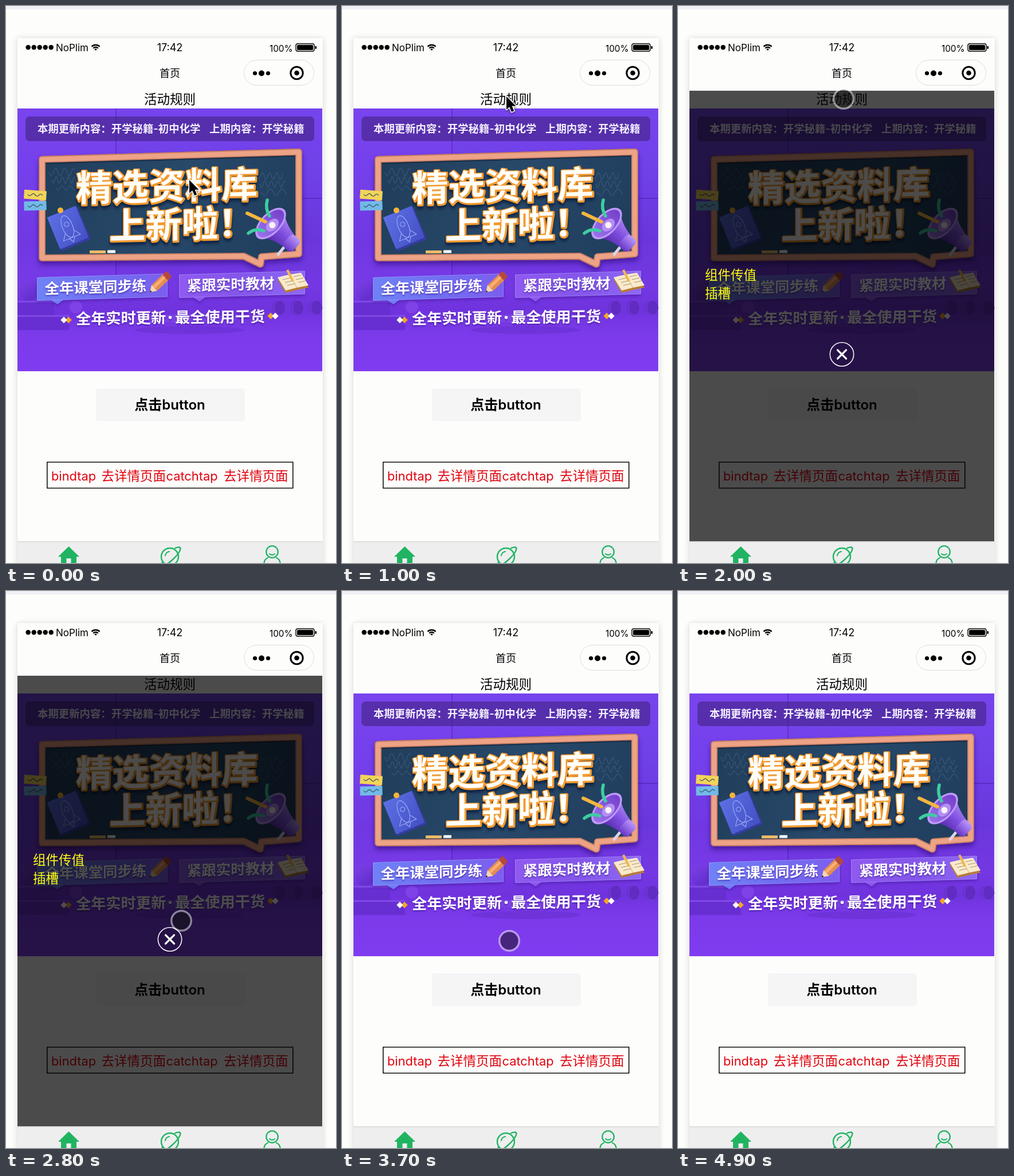
An HTML page with a canvas for the animation above (5000 ms loop, 576 px wide and 973 px high).

```html
<!DOCTYPE html>
<html lang="zh-CN">
<head>
<meta charset="utf-8">
<title>首页</title>
<style>
html, body { margin: 0; width: 100%; height: 100%; overflow: hidden; background: #fdfdfb; }
canvas { display: block; width: 576px; height: 973px; }
</style>
</head>
<body>
<canvas id="stage" width="576" height="973"></canvas>
<script>
const W = 576, H = 973, LOOP = 5000, STEP = 100;
const LEFT = 20, WIDE = 532, MID = LEFT + WIDE / 2;
const FONT = 'Inter, "Noto Sans CJK SC", "Noto Sans CJK", sans-serif';
const view = document.getElementById('stage').getContext('2d');
const base = document.createElement('canvas');
base.width = W;
base.height = H;
let c = base.getContext('2d');

function paint(fill, stroke, width = 1) {
  if (fill) { c.fillStyle = fill; c.fill(); }
  if (stroke) { c.strokeStyle = stroke; c.lineWidth = width; c.stroke(); }
}
function rect(x, y, w, h, fill) {
  c.fillStyle = fill;
  c.fillRect(x, y, w, h);
}
function box(x, y, w, h, r, fill, stroke, width) {
  c.beginPath();
  c.roundRect(x, y, w, h, r);
  paint(fill, stroke, width);
}
function oval(x, y, rx, ry, fill, stroke, width) {
  c.beginPath();
  c.ellipse(x, y, rx, ry, 0, 0, 7);
  paint(fill, stroke, width);
}
function dot(x, y, r, fill, stroke, width) {
  oval(x, y, r, r, fill, stroke, width);
}
function shape(d, fill) {
  c.fillStyle = fill;
  c.fill(new Path2D(d));
}
function curve(d, color, width) {
  c.strokeStyle = color;
  c.lineWidth = width;
  c.stroke(new Path2D(d));
}
function wave(x, y, w, amp, turns, color) {
  c.beginPath();
  for (let i = 0; i <= w; i++) c.lineTo(x + i, y + amp * Math.sin(i / w * turns * 2 * Math.PI));
  paint(null, color, 1.2);
}
function grad(x0, y0, x1, y1, ...colors) {
  const g = c.createLinearGradient(x0, y0, x1, y1);
  colors.forEach((k, i) => g.addColorStop(i / (colors.length - 1), k));
  return g;
}
function text(s, x, cy, size, color, weight = 400, align = 'left') {
  c.font = `${weight} ${size}px ${FONT}`;
  c.textAlign = align;
  c.fillStyle = color;
  c.fillText(s, x, cy + size * 0.37);
}
function shadow(color, blur, dy) {
  c.shadowColor = color;
  c.shadowBlur = blur;
  c.shadowOffsetY = dy;
}
// Local origin at x, y, turned by an angle or only sloped.
function turned(x, y, angle, draw) {
  c.save();
  c.translate(x, y);
  c.rotate(angle);
  draw();
  c.restore();
}
function sloped(x, y, slope, draw) {
  c.save();
  c.transform(1, slope, 0, 1, x, y);
  draw();
  c.restore();
}
function seeded(seed) {
  return () => (seed = seed * 16807 % 2147483647) / 2147483647;
}

function phone() {
  rect(0, 0, W, H, '#fdfdfb');
  rect(0, 0, W, 6, '#f0f0f6');
  c.save();
  shadow('rgba(0,0,0,.16)', 10, 1);
  rect(LEFT, 56, WIDE + 1, H, '#fdfdfc');
  c.restore();
}

function statusBar() {
  for (let i = 0; i < 5; i++) dot(38.7 + i * 10, 72.3, 4.2, '#000');
  text('NoPlim', 87, 72.5, 17, '#000');
  for (const r of [2, 6, 10]) {
    c.beginPath();
    c.arc(156.5, 78, r, -2.35, -0.79);
    paint(null, '#000', 2.4);
  }
  text('17:42', MID, 72, 18, '#000', 400, 'center');
  text('100%', 460, 74, 15.3, '#000');
  box(506, 66, 32, 13, 3, null, '#000', 1.4);
  box(508, 68, 28, 9, 1.5, '#000');
  box(539.5, 70, 2.5, 5, 1, '#000');
}

function navBar() {
  text('首页', MID, 117, 18, '#000', 400, 'center');
  box(415.5, 94.5, 122, 44, 22, '#fdfdfb', '#dcdde0');
  for (const i of [-1, 0, 1]) dot(446 + i * 11.5, 117.5, i ? 3.6 : 5, '#000');
  dot(507.5, 117, 10.7, null, '#000', 3);
  dot(507.5, 117, 4.3, '#000');
  text('活动规则', MID, 163, 22.5, '#000', 400, 'center');
}

function scenery() {
  const crease = 'rgba(65,20,160,.4)';
  rect(LEFT, 179, WIDE, 459, grad(0, 179, 0, 638, '#7644ec', '#7040e8', '#6a36dc', '#7839e6', '#803cf0'));
  rect(LEFT, 179, 172, 330, 'rgba(135,65,245,.2)');
  rect(191, 179, 2, 320, crease);
  rect(517, 335, 35, 2, crease);
  rect(LEFT, 490, WIDE, 80, grad(0, 490, 0, 570, 'rgba(90,35,200,0)', 'rgba(90,35,200,.3)', 'rgba(90,35,200,0)'));
  dot(40, 497, 18, grad(25, 480, 50, 515, '#7c3fe4', '#602dca'));
  for (const i of [0, 1]) {
    rect(LEFT, 515 + i * 25, 64 + i * 26, 26, '#672fd2');
    rect(LEFT, 515 + i * 25, 64 + i * 26, 3, '#8048e4');
    oval(320, 566 - i * 20, 96 - i * 10, 7, i ? '#7a42e4' : '#6f33da');
  }
  for (let x = 478; x < 552; x += 32) {
    box(x - 14, 514, 24, 26, 12, '#6832cf');
    oval(x, 527, 10, 13, '#602cc4', '#753edb');
  }
  dot(122, 526, 11, 'rgba(175,110,255,.25)');
}

function board() {
  const edge = new Path2D('M63 268 L511 255 V433 L446 438 L444 451 L415 437 L63 440 Z');
  const frame = (color, width) => { c.strokeStyle = color; c.lineWidth = width; c.stroke(edge); };
  c.lineJoin = 'round';
  c.save();
  shadow('rgba(45,10,120,.6)', 8, 6);
  frame('#c47b61', 12);
  c.restore();
  c.fillStyle = grad(60, 260, 510, 440, '#203d5a', '#28496a', '#1f3c5c');
  c.fill(edge);
  frame('#c47b61', 12);
  frame('#eda386', 8.5);
  curve('M69 275 L505 262', 'rgba(15,30,50,.6)', 2);

  const rnd = seeded(7);
  for (let i = 0; i < 6; i++) {
    const x = i % 2 ? 435 + rnd() * 15 : 75 + rnd() * 15;
    wave(x, 290 + i * 7, 45, 2 + rnd() * 5, 2 + rnd() * 3, 'rgba(180,205,225,.16)');
  }
  box(146, 427, 28, 5, 1, '#edbc69');
  box(177, 426.5, 14, 5, 1, '#fff');
}

function headline(s, x, y) {
  sloped(x, y, -0.025, () => {
    c.strokeStyle = '#f29a30';
    c.lineWidth = 5;
    c.save();
    shadow('rgba(5,20,50,.6)', 4, 5);
    text(s, 0, 0, 63.5, '#fff', 900);
    c.strokeText(s, 1, 24.5);
    c.restore();
    text(s, 0, 0, 63.5, '#fffefa', 900);
  });
}

function notes() {
  ['#f1d45a', '#72b9e8'].forEach((color, i) => {
    turned(51, 330 + i * 19, 0.07 - i * 0.09, () => {
      rect(-19.5, -8, 39, 16, color);
      wave(-13, 0, 26, 2, 2, '#36505e');
    });
  });
  turned(108, 387, -0.39, () => {
    const ink = '#a9b5fa';
    rect(-26, -27, 55, 61, '#343c9f');
    rect(-27, -30, 54, 60, grad(-27, -30, 27, 30, '#5d70e4', '#444fc4'));
    oval(0, -2, 9, 20, null, ink);
    dot(0, -6, 4, null, ink);
    curve('M-8 8 L-16 19 H16 L8 8 M-5 19 L0 27 L5 19', ink, 1);
  });
  dot(95, 357, 5, '#f8b436');
}

function megaphone() {
  c.lineCap = 'round';
  curve('M475 434 L488 418', '#d9d4ea', 5);
  turned(462, 380, 0.76, () => {
    shape('M0 -34 Q16 -18 44 -14 V14 Q16 18 0 34 Z', grad(0, -30, 0, 30, '#b28bf8', '#7c4bdd', '#4d249f'));
    box(39, -14, 22, 28, 7, grad(0, -14, 0, 14, '#bc98ff', '#6635c5'));
    oval(0, 0, 18, 34, '#bd9af9');
    oval(0, 0, 15, 30, grad(0, -30, 0, 30, '#7440cb', '#9b70ea'));
    oval(4, 0, 9, 13, '#b48ff6');
    dot(4, 0, 5.5, '#fff4f4');
  });
  curve('M421 362 L453 377', '#f2b63f', 6);
  curve('M456 339 Q452 354 460 367 M423 397 Q435 387 450 393', '#3dceA0', 5.5);
  c.lineCap = 'butt';
}

function tag(x, y, w, label, pad, ...colors) {
  sloped(x, y, -0.03, () => {
    c.save();
    shadow('rgba(50,10,130,.4)', 5, 3);
    shape(`M0 0 H${w} V41 H46 L36 48 L25 41 H0 Z`, grad(0, 0, w, 0, ...colors));
    c.restore();
    box(0.5, 0.5, w - 1, 40, 2, null, 'rgba(190,175,255,.4)');
    shadow('rgba(50,20,140,.6)', 3, 2);
    text(label, pad, 20, 25.4, '#fff', 700);
  });
}

function pencil() {
  turned(251, 500, -0.76, () => {
    shape('M0 0 L11 -7 V7 Z', '#f7d7ad');
    rect(11, -7, 28, 14, '#e58c50');
    rect(11, -4, 28, 5, '#f9b174');
    box(37, -7, 10, 14, 3, '#b5493f');
    dot(2, 0, 1.5, '#4a302c');
  });
}

function book() {
  const spread = 'M0 0 L21 -5 L41 -8 L54 14 L34 18 L14 23 Z';
  turned(474, 478, 0, () => shape(spread, '#b77c35'));
  turned(474, 474, 0, () => {
    shape(spread, '#f8eacb');
    curve('M21 -5 L34 18', '#d3b27f', 1);
    for (let i = 0; i < 3; i++) curve(`M${9 + i * 4} ${4 + i * 5} l13 -3 m6 -2 l13 -3`, '#ae9070', 1);
    curve('M17 -13 L27 7', '#f2b749', 4);
  });
}

function slogan() {
  c.save();
  shadow('rgba(50,10,130,.6)', 3, 2);
  sloped(122, 546, -0.012, () => {
    text('全年实时更新', 0, 0, 26.2, '#fff', 700);
    text('最全使用干货', 173, 0, 26.2, '#fff', 700);
    dot(164.5, 0, 2.8, '#fff');
  });
  c.restore();
  for (const side of [-1, 1]) {
    ['#f4a52c', '#fff'].forEach((color, i) => {
      turned(MID - 0.5 + side * (176.5 + i * 8), 545 - side * 3.5, Math.PI / 4, () => rect(-4, -4, 8, 8, color));
    });
  }
}

function banner() {
  scenery();
  box(34, 193, 504, 43, 7, 'rgba(66,34,130,.6)');
  text('本期更新内容：开学秘籍-初中化学', 55, 214.5, 18.4, '#f3efff', 600);
  text('上期内容：开学秘籍', 355, 214.5, 18.4, '#f3efff', 600);
  board();
  headline('精选资料库', 122, 318);
  headline('上新啦！', 180, 384);
  notes();
  megaphone();
  tag(54, 474, 228, '全年课堂同步练', 13.5, '#6f82f6', '#716ff2', '#7c5eee');
  tag(302, 469, 220, '紧跟实时教材', 14, '#8f5af0', '#8456ea', '#8f68f4');
  pencil();
  book();
  slogan();
}

function controls() {
  box(157, 668, 260, 57, 5, '#f5f5f6');
  text('点击button', MID, 696.5, 24, '#000', 600, 'center');
  box(71.8, 796.8, 429, 45.5, 0, null, '#111', 1.6);
  ['bindtap', 'catchtap'].forEach((name, i) => {
    text(name, 79 + i * 200.5, 820.5, 21.8, '#e0040f');
    text('去详情页面', 166.5 + i * 213.5, 820.5, 22.5, '#e0040f');
  });
}

function tabs() {
  const green = '#20b462', back = '#eeeeef';
  rect(LEFT, 935, WIDE + 1, 38, back);
  rect(LEFT, 935, WIDE + 1, 1.5, '#d9d9da');
  shape('M91 962 L109.5 944 L128 962 H123 V973 H96 V962 Z', green);
  rect(105.5, 965, 8, 8, back);
  c.lineCap = 'round';
  dot(286, 962, 15, null, green, 2.4);
  dot(464.5, 953.5, 10.3, null, green, 2.3);
  curve('M274 971 C263 983 273 983 291 967 C307 952 309 941 295 947', green, 2.4);
  curve('M278 960 Q279 954 285 953 M460 957 Q464.5 961 469 957', green, 2);
  curve('M450 975 Q451 966 457 964 M472 964 Q478 966 479 975', green, 2.3);
  c.lineCap = 'butt';
}

function popup() {
  rect(LEFT, 148, WIDE, 787, 'rgba(0,0,0,.7)');
  text('组件传值', 47, 470, 22.5, '#ffff14');
  text('插槽', 47, 501.5, 22.5, '#ffff14');
  dot(MID, 608.5, 20.7, null, '#f4f2f8', 1.6);
  c.lineCap = 'round';
  curve('M278.5 601 l15 15 m0 -15 l-15 15', '#fff', 3.2);
  c.lineCap = 'butt';
}

function arrow(x, y) {
  const d = 'M0 0 V23 L5.3 18.2 L9 27 L13.2 25.2 L9.6 16.7 H16.5 Z';
  turned(x, y, 0, () => {
    c.lineJoin = 'round';
    shadow('rgba(0,0,0,.35)', 3, 2);
    curve(d, '#fff', 3);
    c.shadowColor = 'transparent';
    shape(d, '#000');
  });
}

function touch(x, y) {
  dot(x, y, 16, 'rgba(20,20,20,.52)');
  dot(x, y, 17.3, null, 'rgba(255,255,255,.48)', 3.4);
}

// Each move: start, end, dx, dy.
const MOVES = [[0, 900, -33, -146], [1300, 1500, 2, 4], [2200, 2800, 17, 414], [2800, 3300, -14, 35]];
function pointer(t) {
  let x = 320, y = 304;
  for (const [from, to, dx, dy] of MOVES) {
    const u = Math.min(1, Math.max(0, (t - from) / (to - from)));
    const k = u * u * (3 - 2 * u);
    x += dx * k;
    y += dy * k;
  }
  return [x, y];
}

phone();
statusBar();
navBar();
banner();
controls();
tabs();
c = view;

function frame() {
  const t = Math.floor(performance.now() % LOOP / STEP) * STEP;
  c.drawImage(base, 0, 0);
  if (t >= 2000 && t < 3700) popup();
  if (t < 1300) arrow(...pointer(t));
  else if (t < 4400) touch(...pointer(t));
  requestAnimationFrame(frame);
}
frame();
</script>
</body>
</html>
```
